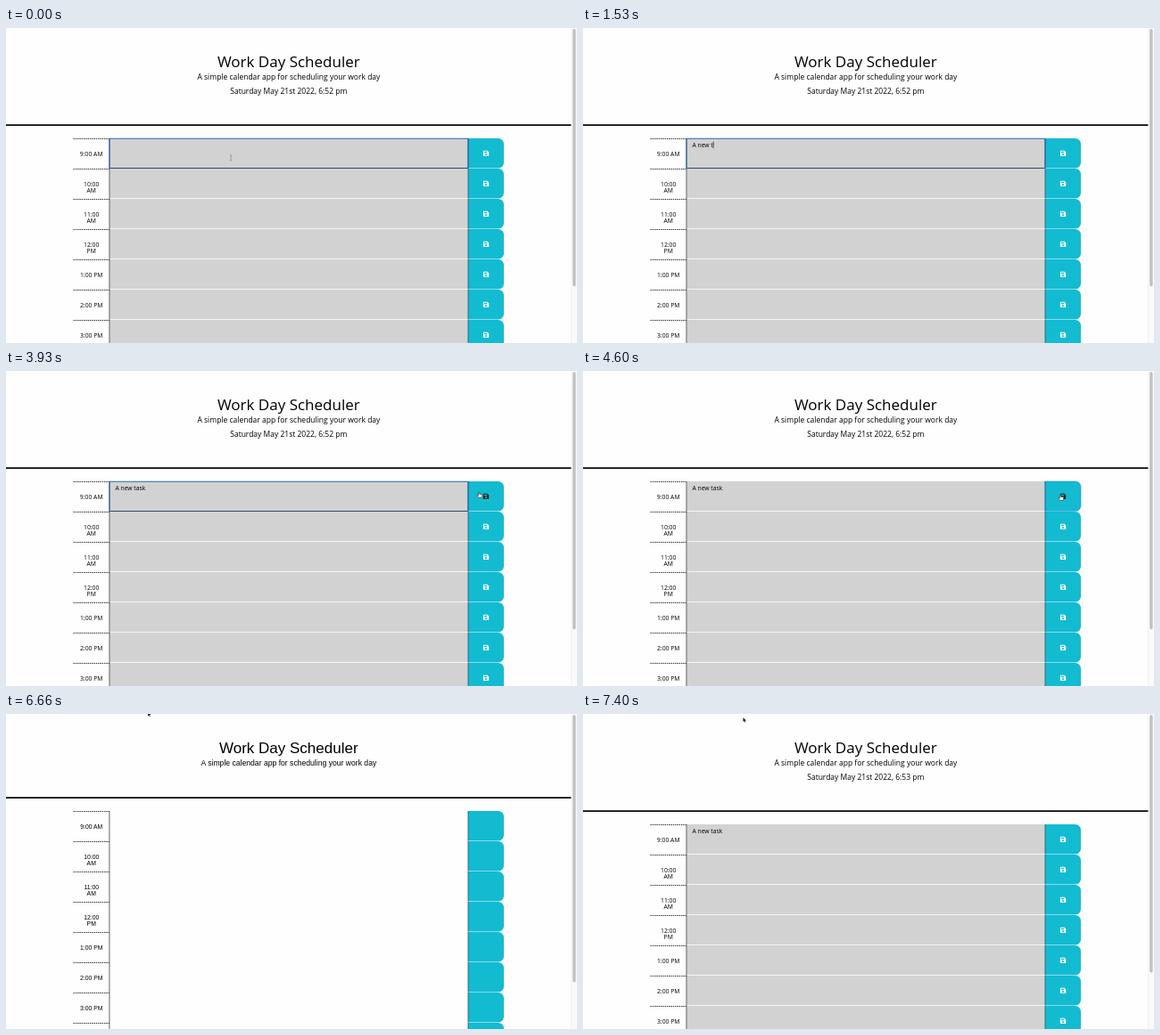
Animation of 640x354 px, one loop 8000 ms. Source, as an HTML page:

```html
<!DOCTYPE html>
<html lang="en">
<head>
<meta charset="utf-8">
<title>Work Day Scheduler</title>
<style>
  html, body { margin: 0; width: 100%; height: 100%; overflow: hidden; background: #fefefe; }
  svg { display: block; width: 100vw; height: 100vh; }
  text { white-space: pre; fill: #000; }
  .ready { font-family: "Open Sans", sans-serif; }
  .loading { font-family: "Liberation Sans", Arial, sans-serif; }
  .middle { text-anchor: middle; }
</style>
</head>
<body>
<svg id="stage" viewBox="0 0 640 354" preserveAspectRatio="none"></svg>
<script>
const LOOP = 8000, FPS = 15;
const RELOAD = 6660, READY = 6730, SAVE = 4400;
const ROW = 34, TEAL = '#13bbd1', GRAY = '#d2d2d2';
const HOURS = ['9:00 AM', '10:00|AM', '11:00|AM', '12:00|PM', '1:00 PM', '2:00 PM', '3:00 PM', '4:00 PM'];
const TASK = 'A new task';
const KEY_TIMES = [600, 860, 1000, 1130, 1200, 1330, 1530, 1660, 1860, 2000];
const CARET_ON = [[460, 2530], [3000, 3530], [4030, SAVE]];
// time, x, y
const MOUSE = [
  [0, 252, 146], [3460, 252, 146], [3600, 290, 145], [3730, 400, 142], [3860, 512, 139],
  [3930, 530, 136], [4130, 534, 138], [4600, 535, 139], [4800, 535, 139], [4930, 500, 128],
  [5060, 380, 78], [5200, 220, 18], [5260, 185, 6], [5530, 185, 6], [5600, 159, -2.5],
  [7330, 159, -2.5], [7400, 179.5, 4]
];

const stage = document.getElementById('stage');

function add(parent, tag, attrs = {}, content = '') {
  const el = document.createElementNS('http://www.w3.org/2000/svg', tag);
  for (const name in attrs) el.setAttribute(name, attrs[name]);
  el.textContent = content;
  return parent.appendChild(el);
}
const rect = (g, x, y, width, height, fill, more) => add(g, 'rect', { x, y, width, height, fill, ...more });
const path = (g, d, more) => add(g, 'path', { d, ...more });
const label = (g, x, y, size, content, cls = 'middle') =>
  add(g, 'text', { x, y, 'font-size': size, class: cls }, content);
const show = (el, on) => el.setAttribute('visibility', on ? 'visible' : 'hidden');
const buttonShape = y => `M518 ${y}h33.6a6.4 6.4 0 0 1 6.4 6.4v20.8a6.4 6.4 0 0 1 -6.4 6.4h-33.6z`;

function saveIcon(g, y) {
  return path(g, `M535.6 ${y}h4l1.6 1.6v4a.7 .7 0 0 1 -.7 .7h-4.9a.7 .7 0 0 1 -.7 -.7v-4.9a.7 .7 0 0 1 .7 -.7z
    m.2 .9v1.5h3.3v-1.5z m2.2 2.4a1.05 1.05 0 1 0 .01 0z`, { fill: '#fff', 'fill-rule': 'evenodd' });
}

function buildPage(loaded) {
  const g = add(stage, 'g', { class: loaded ? 'ready' : 'loading' });
  const top = loaded ? 124 : 109;
  const icons = [];
  label(g, 316.8, loaded ? 43.9 : 43.5, 17, 'Work Day Scheduler');
  label(g, 316.9, 58.4, loaded ? 8.5 : 8.62, 'A simple calendar app for scheduling your work day');
  rect(g, 0, top - 15.8, 634, 1.8, '#111');

  HOURS.forEach((hour, i) => {
    const y = top + i * ROW;
    path(g, `M75.5 ${y + .5}H116`, { stroke: '#333', 'stroke-dasharray': '1.4 .9' });
    hour.split('|').forEach((part, n) => label(g, 95.7, y + 19.6 + n * 7, 6.8, part));
    if (loaded) rect(g, 116, y, 402, ROW - .8, GRAY);
    path(g, buttonShape(y), { fill: TEAL });
    rect(g, 517.6, y, .8, 33.6, '#245a66');
    if (loaded) icons.push(saveIcon(g, y + 13.8));
  });
  rect(g, 115.5, top, .9, 354 - top, '#555');

  rect(g, 633.6, 0, 6.4, 354, '#fafafa');
  rect(g, 633.6, 0, .5, 354, '#e6e6e6');
  rect(g, 635.2, 1, 3.4, loaded ? 289.5 : 300.5, '#c1c1c1', { rx: 1.7 });
  return { g, icons };
}

const ready = buildPage(true);
const loading = buildPage(false);
const date = label(ready.g, 316.8, 73.6, 8.5, '');
const task = label(ready.g, 122.4, 133.9, 6.8, '', 'task');
const caret = rect(ready.g, 0, 127.6, .7, 7.6, '#111');
const focusBox = add(ready.g, 'g', { fill: 'none' });
rect(focusBox, 116, 124.3, 402, 33.2, 'none', { stroke: '#2868b4', 'stroke-width': 1.1, rx: .6 });
path(focusBox, 'M116.5 157.5H517.5', { stroke: '#34465c', 'stroke-width': .9 });
const focusButton = path(ready.g, buttonShape(124), { fill: 'none', stroke: '#007bff', 'stroke-opacity': .3, 'stroke-width': 1.5 });

const cursors = { beam: add(stage, 'g'), hand: add(stage, 'g'), arrow: add(stage, 'g') };
path(cursors.beam, 'M-1 -3.2Q0 -3.2 0 -2.3Q0 -3.2 1 -3.2M0 -2.3V2.3M-1 3.2Q0 3.2 0 2.3Q0 3.2 1 3.2',
  { fill: 'none', stroke: '#777', 'stroke-width': .6 });
path(cursors.hand, `M-.6 .3Q0 -.6 .6 .3V2.2L3 2.7Q4 3 3.8 4L3.2 6.4H-.2L-2 4.2Q-2.4 3.2 -1.4 3.4L-.6 4z`,
  { fill: '#fff', stroke: '#222', 'stroke-width': .6 });
path(cursors.arrow, 'M0 0V4.8L1.1 3.8L1.9 5.6L2.7 5.2L1.9 3.5H3.4z',
  { fill: '#111', stroke: '#fff', 'stroke-width': .5, 'paint-order': 'stroke' });

function mouseAt(t) {
  const next = MOUSE.findIndex(p => p[0] > t);
  if (next < 0) return MOUSE[MOUSE.length - 1].slice(1);
  const [t0, x0, y0] = MOUSE[next - 1], [t1, x1, y1] = MOUSE[next];
  const k = (t - t0) / (t1 - t0);
  return [x0 + (x1 - x0) * k, y0 + (y1 - y0) * k];
}

function render(t) {
  const blank = t >= RELOAD && t < READY;
  ready.g.style.display = blank ? 'none' : '';
  loading.g.style.display = blank ? '' : 'none';

  date.textContent = `Saturday May 21st 2022, 6:5${t < READY ? 2 : 3} pm`;
  task.textContent = TASK.slice(0, KEY_TIMES.filter(k => k <= t).length);
  const caretOn = CARET_ON.some(([from, to]) => t >= from && t < to);
  caret.style.display = caretOn ? '' : 'none';
  if (caretOn) caret.setAttribute('x', 122.4 + task.getComputedTextLength());
  show(focusBox, t < SAVE);
  show(focusButton, t >= SAVE && t < RELOAD);

  const [x, y] = mouseAt(Math.floor((t + 7) * FPS / 1000) * 1000 / FPS);
  const kind = t < 3930 ? 'beam' : t < 4930 ? 'hand' : 'arrow';
  const typing = t >= 1000 && t < 3530;
  for (const name in cursors) show(cursors[name], name === kind && !typing);
  cursors[kind].setAttribute('transform', `translate(${x} ${y})`);
  ready.icons[0].setAttribute('fill', kind === 'hand' ? '#222' : '#fff');
}

const start = performance.now();
function tick() {
  render((performance.now() - start) % LOOP);
  requestAnimationFrame(tick);
}
tick();
</script>
</body>
</html>
```
